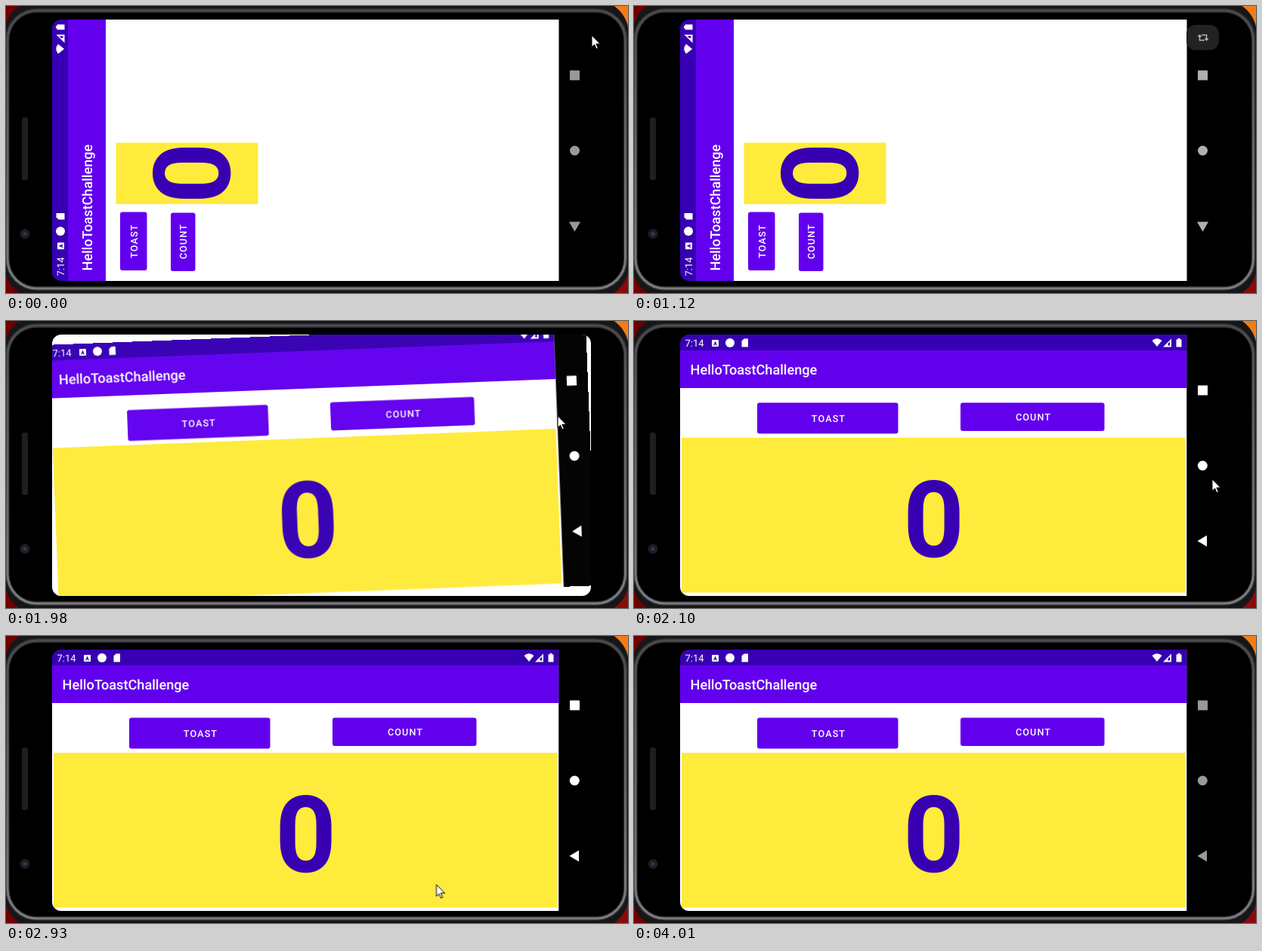
These frames come from a looping animation (823x381 px, 4.11 s). An HTML page:

```html
<!DOCTYPE html>
<html lang="en">
<head>
<meta charset="utf-8">
<title>Screen rotation</title>
<style>
html, body { margin: 0; width: 100%; height: 100%; overflow: hidden; background: #000; }
svg { display: block; width: 823px; height: 381px; }
text { font-family: Roboto, sans-serif; fill: #fff; text-rendering: geometricPrecision; }
.title { font-size: 18.15px; font-weight: 500; }
.label { font-size: 12.6px; font-weight: 500; letter-spacing: 1.12px; text-anchor: middle; }
.count { font-size: 141.5px; font-weight: 700; text-anchor: middle; fill: #3700b3; }
.dark { fill: #3700b3; }
.main { fill: #6200ee; }
.panel { fill: #ffeb3b; }
.rim { fill: none; }

.anim { animation: 4110ms step-end infinite; }
#backdrop { animation-name: backdrop; }
#portrait { animation-name: portrait; }
#landscape { animation-name: landscape; transform-origin: 417.5px 191.5px; }
#navP { animation-name: navP; }
#navL { animation-name: navL; }
#hint { animation-name: hint; transform-origin: 753px 42px; }
#hintBg { animation-name: hintBg; }
#cursor { animation-name: cursor; }

@keyframes backdrop {
  0% { opacity: 0; }
  44.525% { opacity: 1; }
  51.094%, 100% { opacity: 0; }
}
@keyframes portrait {
  0% { opacity: 1; }
  44.525%, 100% { opacity: 0; }
}
@keyframes landscape {
  0% { opacity: 0; transform: rotate(-45.2deg); }
  44.525% { opacity: .2; transform: rotate(-45.2deg); }
  48.175% { opacity: .985; transform: rotate(-2.2deg); }
  51.094%, 100% { opacity: 1; transform: none; }
}
@keyframes navP {
  0% { fill: #999; }
  13.868%, 100% { fill: #b0b0b0; }
}
@keyframes navL {
  0% { fill: #fff; }
  97.566%, 100% { fill: #999; }
}
@keyframes hint {
  0% { opacity: 0; transform: rotate(60deg); }
  2.919% { opacity: .4; transform: rotate(60deg); }
  6.569% { opacity: .7; transform: rotate(30deg); }
  10.218% { opacity: .85; transform: rotate(10deg); }
  13.868%, 100% { opacity: 1; transform: none; }
}
@keyframes hintBg {
  0% { opacity: 0; }
  13.868%, 100% { opacity: 1; }
}
@keyframes cursor {
  0% { transform: translate(775px, 39px); }
  2.919% { transform: translate(773px, 39px); }
  6.569% { transform: translate(-30px, 0); }
  20.924% { transform: translate(806px, 212px); }
  27.25% { transform: translate(-30px, 0); }
  44.525% { transform: translate(732px, 216px); }
  48.175% { transform: translate(730px, 126px); }
  51.094% { transform: translate(765px, 210px); }
  54.744% { transform: translate(775px, 289px); }
  58.394% { transform: translate(772px, 310px); }
  61.313% { transform: translate(768px, 330px); }
  64.963% { transform: translate(-30px, 0); }
  71.289% { transform: translate(569.5px, 330px); }
  74.209% { transform: translate(556px, 350px); }
  77.128% { transform: translate(544px, 363px); }
  80.048% { transform: translate(546px, 312px); }
  83.698% { transform: translate(542px, 220px); }
  86.618% { transform: translate(542px, 97px); }
  89.537%, 100% { transform: translate(-30px, 0); }
}
</style>
</head>
<body>
<svg viewBox="0 0 823 381">
  <defs>
    <clipPath id="screen"><rect x="61" y="18" width="713" height="347" rx="12"/></clipPath>
    <linearGradient id="wall">
      <stop offset=".5" stop-color="#700000"/>
      <stop offset=".5" stop-color="#f57c14"/>
    </linearGradient>
    <linearGradient id="metal" x2="0" y2="1">
      <stop offset="0" stop-color="#4a4a4e"/>
      <stop offset="1" stop-color="#7c7c80"/>
    </linearGradient>

    <!-- status bar and app bar -->
    <g id="bars">
      <rect class="dark" width="670.500" height="22"/>
      <rect class="main" y="21" width="670.500" height="50"/>
      <text x="6.500" y="16" font-size="13">7:14</text>
      <rect x="42" y="7" width="9" height="9" rx="1" fill="#fff"/>
      <path class="dark" d="M46.500 8.500L49 14.500H47.800L47.400 13.300H45.600L45.200 14.500H44Z"/>
      <circle cx="66" cy="11" r="6" fill="#fff"/>
      <path d="M84.500 5.500H90V16.500H81.500V8.500Z" fill="#fff"/>
      <text class="title" x="13.500" y="53">HelloToastChallenge</text>
    </g>
    <g id="signals" fill="#fff">
      <path d="M-45.500 8Q-39 2.500 -32.500 8L-39 16Z"/>
      <path d="M-20 5.500V16.500H-31Z"/>
      <path class="dark" d="M-22 9.500V14.500H-24.500V12Z"/>
      <path d="M-11.500 5H-8.500V6.500H-6.500V16.500H-13.500V6.500H-11.500Z"/>
    </g>
  </defs>

  <!-- phone body -->
  <rect width="823" height="381" fill="url(#wall)"/>
  <rect y="330" x="400" width="423" height="51" fill="#8a0a0a"/>
  <rect x="-2" y="-8" width="826" height="397" rx="45" fill="#161618"/>
  <rect class="rim" x="2" y="6" width="817.500" height="369" rx="39" stroke="#2c2c2f" stroke-width="6"/>
  <rect class="rim" x="2" y="6" width="817.500" height="369" rx="39" stroke="url(#metal)" stroke-width="3"/>
  <rect x="4.500" y="9" width="812.500" height="363" rx="36"/>
  <rect x="21" y="148" width="8" height="83" rx="3" fill="#1f1f20"/>
  <circle cx="25" cy="302.500" r="6.500" fill="#1d1e23"/>
  <circle cx="25" cy="302.500" r="2.500" fill="#30365a"/>

  <g clip-path="url(#screen)">
    <rect id="backdrop" class="anim" x="61" y="18" width="713" height="347" fill="#fff"/>

    <g id="landscape" class="anim">
      <g transform="translate(61 18)">
        <rect width="670.500" height="347" fill="#fff"/>
        <use href="#bars"/>
        <use href="#signals" x="670"/>
        <rect class="main" x="102" y="90.500" width="186.500" height="41" rx="3"/>
        <text class="label" x="196.500" y="115.500">TOAST</text>
        <rect class="main" x="371" y="90.500" width="190.500" height="37.500" rx="3"/>
        <text class="label" x="467.500" y="114">COUNT</text>
        <rect class="panel" x="2" y="137" width="666" height="205.500"/>
        <text class="count" x="335.500" y="295">0</text>
        <rect x="670.500" width="42.500" height="347"/>
      </g>
      <g id="navL" class="anim">
        <rect x="746" y="85.500" width="13" height="13" rx=".5"/>
        <circle cx="752.300" cy="192" r="6.500"/>
        <path d="M745.500 292L758 284.500V299.500Z"/>
      </g>
    </g>

    <g id="portrait" class="anim">
      <g transform="translate(61 365) rotate(-90)">
        <rect width="347" height="713" fill="#fff"/>
        <use href="#bars"/>
        <use href="#signals" x="347"/>
        <rect class="main" x="14" y="90" width="77.500" height="35.500" rx="3"/>
        <text class="label" x="53" y="112.500">TOAST</text>
        <rect class="main" x="13" y="157" width="77.500" height="32.500" rx="3"/>
        <text class="label" x="52.500" y="178">COUNT</text>
        <rect class="panel" x="102" y="84.500" width="81.500" height="188"/>
        <text class="count" x="143" y="234.500">0</text>
        <rect y="670.500" width="347" height="43"/>
      </g>
      <g id="navP" class="anim">
        <rect x="746" y="85.500" width="13" height="13" rx=".5"/>
        <circle cx="752.500" cy="192" r="6.500"/>
        <path d="M745 286.500H760L752.500 299.500Z"/>
      </g>
      <rect id="hintBg" class="anim" x="731" y="25" width="43" height="33.500" rx="12" fill="#222"/>
      <g id="hint" class="anim">
        <path d="M748.500 39.500V45.500H755M757.500 44.500V38.500H751" fill="none" stroke="#b5b5b5" stroke-width="1.500"/>
        <path d="M745.500 41L748.500 37.500L751.500 41ZM754.500 43L757.500 46.500L760.500 43Z" fill="#b5b5b5"/>
      </g>
    </g>
  </g>

  <path id="cursor" class="anim" d="M0 0V15.500L3.600 12.200L6 18L8.300 17L5.900 11.300H11Z" fill="#fff" stroke="#000" stroke-width="1"/>
</svg>
</body>
</html>
```
